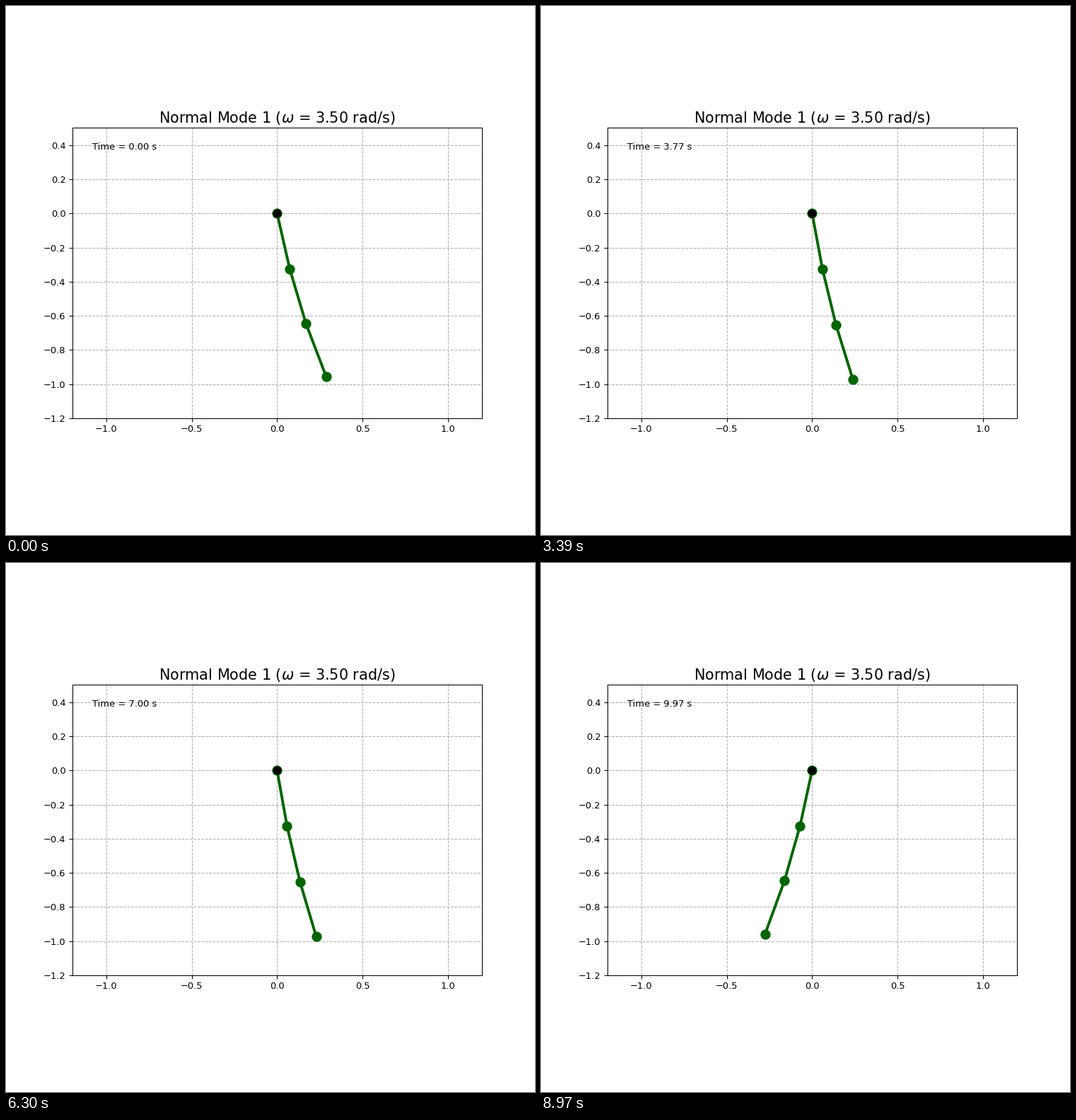
These frames come from a looping animation (748 by 748 pixels, 9000 ms). A matplotlib script:

```python
import numpy as np
import matplotlib.pyplot as plt
from matplotlib.animation import FuncAnimation

FPS, FRAMES = 30, 300
G, LENGTH, MASS = 9.8, 1 / 3, 1 / 3
AMPLITUDE = 0.2

# Small-angle triple pendulum: M * theta'' + K * theta = 0
M = MASS * LENGTH**2 * np.array([[3, 2, 1], [2, 2, 1], [1, 1, 1]])
K = MASS * G * LENGTH * np.diag([3, 2, 1])

values, vectors = np.linalg.eig(np.linalg.solve(M, K))
lowest = np.argmin(values)
omega = np.sqrt(values[lowest])
mode = np.abs(vectors[:, lowest])
mode /= np.sqrt(mode @ M @ mode)


def chain(t):
    theta = AMPLITUDE * mode * np.cos(omega * t)
    x = np.cumsum(LENGTH * np.sin(theta))
    y = -np.cumsum(LENGTH * np.cos(theta))
    return np.r_[0, x], np.r_[0, y]


fig, ax = plt.subplots(figsize=(8, 8), dpi=93.5)
ax.set_aspect("equal")
ax.set_xlim(-1.2, 1.2)
ax.set_ylim(-1.2, 0.5)
ax.grid(True, linestyle="--")
ax.set_title(rf"Normal Mode 1 ($\omega$ = {omega:.2f} rad/s)", fontsize=16)

rods, = ax.plot([], [], "o-", color="darkgreen", lw=3, markersize=10)
ax.plot(0, 0, "ko", markersize=8)
clock = ax.text(0.05, 0.95, "", transform=ax.transAxes, va="top")


def update(i):
    t = i / FPS
    rods.set_data(*chain(t))
    clock.set_text(f"Time = {t:.2f} s")
    return rods, clock


anim = FuncAnimation(fig, update, frames=FRAMES, interval=30, repeat=True)
plt.show()
```
